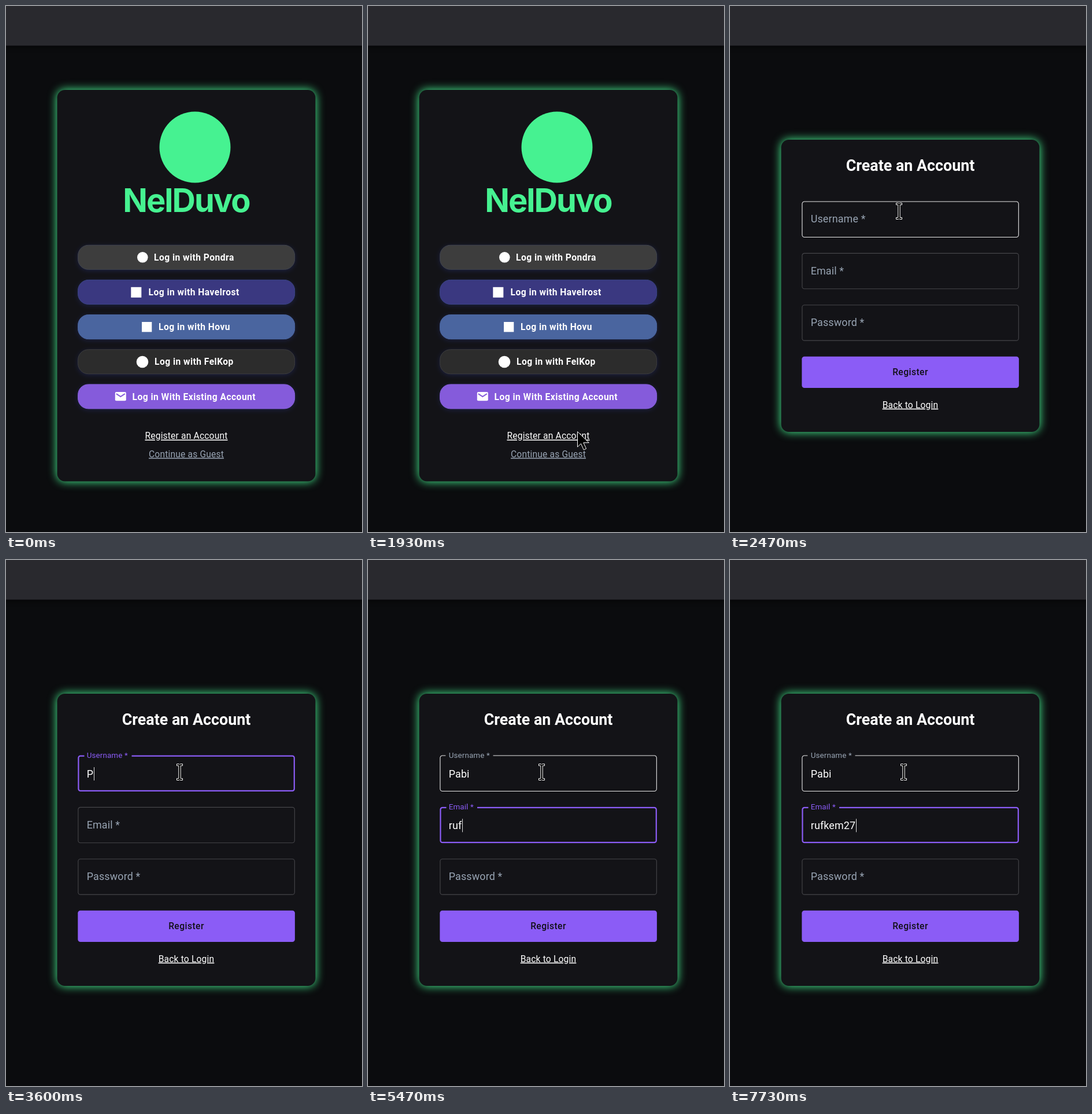
An HTML page for the animation above (8000 ms loop, 616 by 909 pixels).

```html
<!DOCTYPE html>
<html lang="en">
<head>
<title>Sign up</title>
<style>
  html, body { margin: 0; width: 100%; height: 100%; overflow: hidden; background: #0b0c0e; }
  svg { display: block; width: 616px; height: 909px; font-family: Roboto, sans-serif; }
  .btn { font-weight: 700; font-size: 15.64px; letter-spacing: .447px; fill: #fff; }
  .link { font-size: 15.64px; letter-spacing: .167px; text-decoration: underline; fill: #fff; text-anchor: middle; }
  .input { font-size: 17.87px; letter-spacing: .168px; }
  .cursor { fill: #000; stroke: #fff; stroke-width: 1; }
</style>
</head>
<body>
<svg id="stage" viewBox="0 0 616 909" xmlns="http://www.w3.org/2000/svg">
  <defs>
    <filter id="glow" filterUnits="userSpaceOnUse" x="0" y="0" width="616" height="909" color-interpolation-filters="sRGB"><feGaussianBlur stdDeviation="8"/></filter>
    <filter id="soft" filterUnits="userSpaceOnUse" x="-40" y="-40" width="696" height="989" color-interpolation-filters="sRGB"><feGaussianBlur stdDeviation="5"/></filter>
  </defs>
  <rect width="616" height="909" fill="#0b0c0e"/>
  <rect x="-30" y="-30" width="676" height="101" fill="#000" opacity=".55" filter="url(#soft)"/>
  <rect width="616" height="68.5" fill="#29292e"/>
  <g id="login"></g>
  <g id="register"></g>
  <g id="pointer">
    <path class="cursor" data-kind="arrow" d="M.5.5V27L6.5 21.3 11.3 32 15.6 30 10.8 19.7H20.3Z"/>
    <path class="cursor" data-kind="hand" d="M-1.5 12V2Q-1.5.5 0 .5T1.5 2V7.5Q4.5 6.5 5 8.3 7.6 7.4 8.4 9.3 11.6 8.6 11.8 11.5V16Q11.8 18.5 9.8 22.3H-.2Q-.8 19.8-4 15.8-5.2 13.2-4.2 12-2.8 11-1.5 13.2Z"/>
    <path class="cursor" data-kind="beam" d="M-5-14H-1L0-13 1-14H5V-11H1.7V11H5V14H1L0 13-1 14H-5V11H-1.7V-11H-5Z"/>
  </g>
</svg>
<script>
const LOOP = 8000, FPS = 15;
const LEFT = 124.3, RIGHT = 499.9, TEXT_X = 139.7;
const VIOLET = '#8b5cf6', GREEN = '#46f291', MUTED = '#98a4b3';
const $ = id => document.getElementById(id);
const clamp = v => Math.max(0, Math.min(1, v));
const mix = (a, b, p) => a + (b - a) * p;

function card(y, h) {
  const box = `x="88.5" y="${y}" width="447" height="${h}" rx="13.4"`;
  return `<rect ${box} fill="${GREEN}" stroke="${GREEN}" filter="url(#glow)"/><rect ${box} fill="#131317"/>`;
}

function loginButton(i, fill, edge, x, label, icon) {
  const y = 413.3 + i * 60.15;
  const box = (dy, extra) => `<rect x="124.6" y="${y + dy}" width="375" height="42" rx="17.9" ${extra}/>`;
  return box(2, 'fill="#3646b4" opacity=".28" filter="url(#soft)"') +
    box(0, `fill="${fill}" stroke="${edge}"`) + icon +
    `<text class="btn" x="${x}" y="${y + 26.6}">${label}</text>`;
}

const dot = (x, y, r) => `<circle cx="${x}" cy="${y}" r="${r}" fill="#fff"/>`;
const square = (x, y, s) => `<rect x="${x}" y="${y}" width="${s}" height="${s}" fill="#fff"/>`;
const link = (y, label, fill) => `<text class="link" x="312" y="${y}" style="fill:${fill}">${label}</text>`;

const mail = '<rect x="188.8" y="667" width="19" height="15.2" rx="2" fill="#fff"/>' +
  '<path d="M190.8 670.2L198.3 675 205.8 670.2" fill="none" stroke="#855bdb" stroke-width="2"/>';

$('login').innerHTML = card(145, 676.5) +
  `<circle cx="327" cy="244" r="61.5" fill="${GREEN}"/>
  <text x="312" y="356" text-anchor="middle" fill="${GREEN}" style="font:700 56px Inter,sans-serif;letter-spacing:-2px">NelDuvo</text>` +
  loginButton(0, '#3d3d3d', '#40444f', 256, 'Log in with Pondra', dot(236.3, 434.3, 9.3)) +
  loginButton(1, '#3a3880', '#3b4688', 246.5, 'Log in with Havelrost', square(216.3, 485.8, 18)) +
  loginButton(2, '#4a659f', '#4b68a4', 264, 'Log in with Hovu', square(235, 546, 17.3)) +
  loginButton(3, '#2c2c2c', '#3c3c3e', 257, 'Log in with FelKop', dot(236, 615, 10.3)) +
  loginButton(4, '#855bdb', '#8960de', 218.5, 'Log in With Existing Account', mail) +
  link(748.3, 'Register an Account', '#fff') +
  link(779.8, 'Continue as Guest', MUTED);

$('register').innerHTML = card(231, 505) +
  `<text x="312" y="284.5" text-anchor="middle" fill="#fff" font-size="26.8" font-weight="700">Create an Account</text>
  <rect x="${LEFT}" y="605.8" width="${RIGHT - LEFT}" height="54.2" rx="4.5" fill="${VIOLET}"/>
  <text x="312" y="638.3" text-anchor="middle" fill="#121018" style="font-weight:500;font-size:15.64px;letter-spacing:.447px">Register</text>` +
  link(694.7, 'Back to Login', '#fff');

function makeField(top, label, notchEnd) {
  const g = document.createElementNS('http://www.w3.org/2000/svg', 'g');
  g.innerHTML = `<path fill="none"/><text class="input">${label} *</text>
    <text class="input" x="${TEXT_X}" y="${top + 38.4}" fill="#fff"></text>
    <rect y="${top + 20.5}" width="1" height="23" fill="#ddd"/>`;
  $('register').append(g);
  const [border, tag, value, caret] = g.children;
  return { top, notchEnd, border, tag, value, caret };
}

// Outline that starts and ends at the gap cut out for the label.
function outline(top, inset, gapA, gapB) {
  const l = LEFT + inset, r = RIGHT - inset, t = top + inset, b = top + 62.5 - inset, c = 4.5 - inset;
  const arc = (x, y) => `a${c} ${c} 0 0 1 ${x * c} ${y * c}`;
  return `M${gapB} ${t}H${r - c}${arc(1, 1)}V${b - c}${arc(-1, 1)}H${l + c}${arc(-1, -1)}V${t + c}${arc(1, -1)}H${gapA}`;
}

function drawField(f, { lift, focus, hover, text, caret }) {
  const p = 1 - (1 - lift) ** 3;
  const start = focus ? 135.5 : 134.3;
  const end = f.notchEnd - (focus ? 0 : 1);
  f.border.setAttribute('d', outline(f.top, focus ? 1.1 : .55, mix(140, start, p), mix(140, end, p)));
  f.border.setAttribute('stroke', focus ? VIOLET : hover ? '#e9e9ea' : '#46464a');
  f.border.setAttribute('stroke-width', focus ? 2.2 : 1.1);
  f.tag.setAttribute('transform', `translate(${TEXT_X} ${f.top + mix(36.8, 4.5, p)}) scale(${mix(1, .75, p)})`);
  f.tag.setAttribute('fill', focus ? VIOLET : MUTED);
  f.value.textContent = text;
  f.caret.setAttribute('visibility', caret ? 'inherit' : 'hidden');
  if (caret) f.caret.setAttribute('x', Math.round(TEXT_X + .4 + (text ? f.value.getComputedTextLength() : 0)));
}

const user = makeField(337.5, 'Username', 217.5);
const email = makeField(426.8, 'Email', 189);
const password = makeField(516.2, 'Password', 140);

// Steps are counted at 15 per second.
const USER_FOCUS = 40, EMAIL_FOCUS = 67;
const userTyping = [[54, 'P'], [58, 'Pa'], [61, 'Pab'], [63, 'Pabi']];
const emailTyping = [[79, 'r'], [80, 'ru'], [82, 'ruf'], [86, 'rufk'], [88, 'rufken'],
  [94, 'rufke'], [96, 'rufk'], [98, 'ruf'], [102, 'rufk'], [103, 'rufke'], [105, 'rufkem'],
  [108, 'rufkem2'], [116, 'rufkem27']];
const path = [[2, 611, 908], [4, 610, 908], [6, 610, 908], [7, 598, 897], [8, 572, 876], [9, 537, 849],
  [10, 498, 818], [11, 460, 788], [12, 441, 764], [13, 431, 746], [15, 423, 727], [17, 421, 721],
  [18, 421, 721], [19, 414, 722], [20, 400, 726], [21, 382, 731], [22, 369, 734], [23, 363, 735],
  [24, 363, 735], [25, 362, 735], [30, 362, 735], [31, 360, 722], [32, 354, 686], [33, 344, 626],
  [34, 330, 547], [35, 314, 466], [36, 301, 396], [37, 292, 354], [38, 297, 362], [39, 300, 366]];

const typed = (list, step) => list.reduce((s, [at, text]) => step >= at ? text : s, '');

function position(step) {
  const i = path.findIndex(k => k[0] > step);
  if (i < 0) return path[path.length - 1].slice(1);
  const [s0, x0, y0] = path[i - 1], [s1, x1, y1] = path[i];
  const p = (step - s0) / (s1 - s0);
  return [Math.round(mix(x0, x1, p)), Math.round(mix(y0, y1, p))];
}

const inside = (x, y, l, t, r, b) => x >= l && x <= r && y >= t && y <= b;
const overField = (x, y, f) => inside(x, y, LEFT, f.top, RIGHT, f.top + 62.5);

function pointerKind(step, x, y) {
  if (step < 29) return inside(x, y, 240, 730, 383, 753) ? 'hand' : 'arrow';
  if (step < 30) return 'arrow';
  if ([user, email, password].some(f => overField(x, y, f))) return 'beam';
  const clickable = inside(x, y, LEFT, 606, RIGHT, 660) || inside(x, y, 263, 682, 360, 699);
  return clickable ? 'hand' : 'arrow';
}

function draw(ms) {
  const step = Math.floor((ms + 5) * FPS / 1000);
  const registering = step >= 30;
  $('login').setAttribute('visibility', registering ? 'hidden' : 'visible');
  $('register').setAttribute('visibility', registering ? 'visible' : 'hidden');

  const shown = step >= 2;
  const [x, y] = shown ? position(step) : [0, 0];
  const kind = pointerKind(step, x, y);
  const nudge = kind === 'beam' ? .5 : 0;
  $('pointer').setAttribute('visibility', shown ? 'visible' : 'hidden');
  $('pointer').setAttribute('transform', `translate(${x + nudge} ${y + nudge})`);
  for (const c of $('pointer').children) c.style.display = c.dataset.kind === kind ? '' : 'none';

  const lift = start => clamp((step - start + .5) / 3);
  const userFocus = step >= USER_FOCUS && step < EMAIL_FOCUS;
  const emailFocus = step >= EMAIL_FOCUS;
  drawField(user, {
    lift: lift(USER_FOCUS), focus: userFocus, hover: overField(x, y, user),
    text: typed(userTyping, step), caret: userFocus && (step < 47 || step >= 54)
  });
  drawField(email, {
    lift: lift(EMAIL_FOCUS), focus: emailFocus, hover: overField(x, y, email),
    text: typed(emailTyping, step), caret: emailFocus && (step < 75 || step >= 79)
  });
  drawField(password, { lift: 0, focus: false, hover: overField(x, y, password), text: '', caret: false });
}

const begin = performance.now();
function tick() {
  draw((performance.now() - begin) % LOOP);
  requestAnimationFrame(tick);
}
tick();
</script>
</body>
</html>
```
